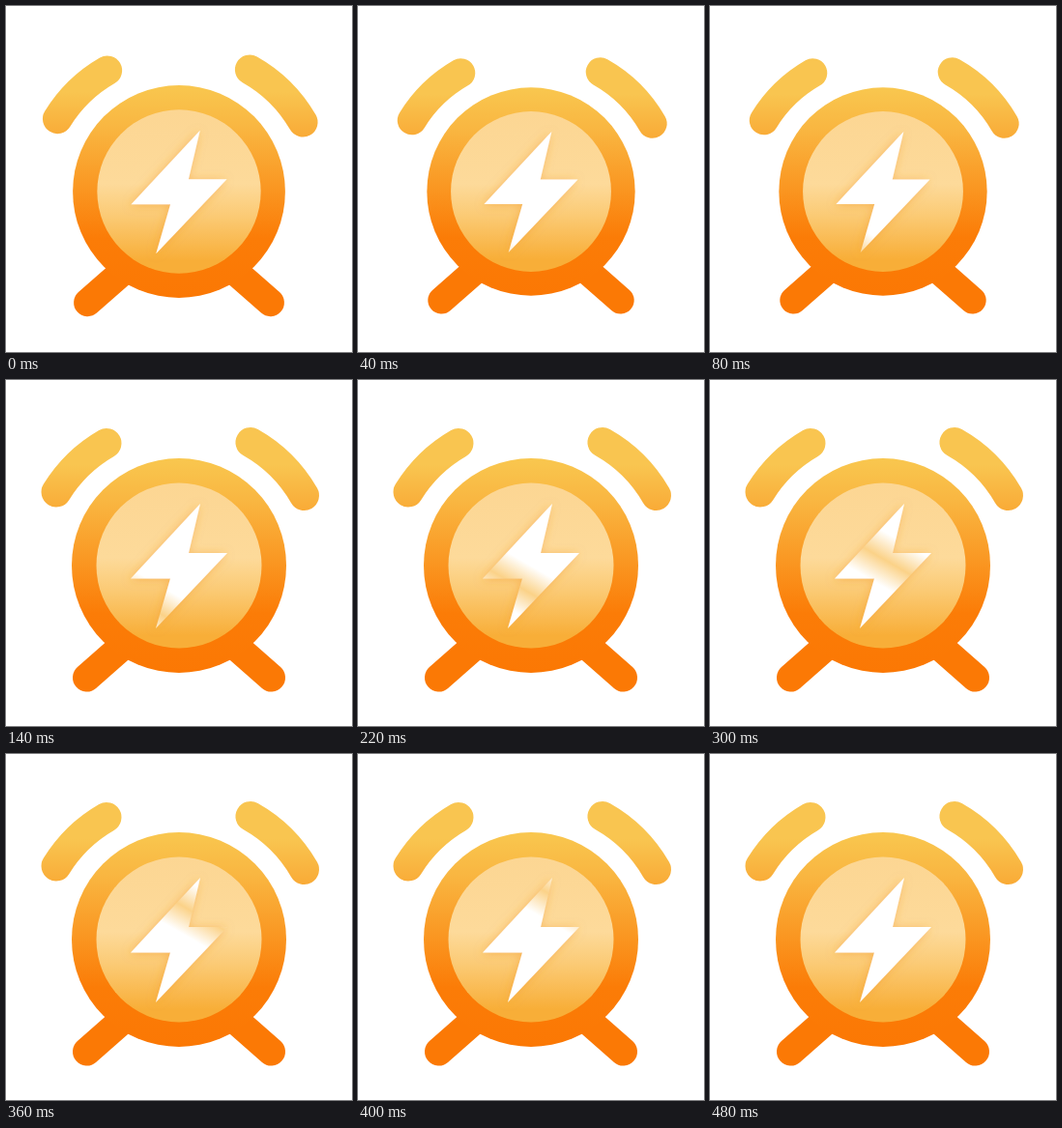
Write an HTML page that moves like this. It is 358 px wide and 358 px high and loops after 500 ms.

```html
<!DOCTYPE html>
<html lang="en">
<head>
<meta charset="utf-8">
<title>Alarm clock</title>
<style>
  html, body { margin: 0; width: 100%; height: 100%; overflow: hidden; background: #fff; }
  svg { display: block; width: 100vw; height: 100vh; }
</style>
</head>
<body>
<svg viewBox="0 0 358 358">
  <defs>
    <linearGradient id="body" gradientUnits="userSpaceOnUse" x1="0" y1="81" x2="0" y2="303">
      <stop offset="0" stop-color="#f9c74f"/>
      <stop offset=".2" stop-color="#f9b641"/>
      <stop offset=".72" stop-color="#fb7c07"/>
      <stop offset="1" stop-color="#fb7804"/>
    </linearGradient>
    <linearGradient id="bell" gradientUnits="userSpaceOnUse" x1="0" y1="50" x2="0" y2="134">
      <stop offset=".45" stop-color="#f9c550"/>
      <stop offset="1" stop-color="#f9ab37"/>
    </linearGradient>
    <linearGradient id="face" gradientUnits="userSpaceOnUse" x1="0" y1="107" x2="0" y2="278">
      <stop offset="0" stop-color="#fcd693"/>
      <stop offset=".45" stop-color="#fdda9a"/>
      <stop offset=".65" stop-color="#fbca74"/>
      <stop offset=".92" stop-color="#f8ae38"/>
    </linearGradient>
    <linearGradient id="shine" gradientUnits="userSpaceOnUse" x1="-25" y1="0" x2="25" y2="0">
      <stop offset="0" stop-color="#fff"/>
      <stop offset=".5" stop-color="#fbd288"/>
      <stop offset="1" stop-color="#fff"/>
    </linearGradient>
    <filter id="glow" x="-30%" y="-30%" width="160%" height="160%">
      <feDropShadow dx="-1" dy="1" stdDeviation="5" flood-color="#f39a2b" flood-opacity=".5"/>
    </filter>
  </defs>
  <g id="clock" fill="none" stroke-linecap="round">
    <path d="M83.500 308L125 271.500M274.500 308L233 271.500" stroke="#fb7905" stroke-width="29"/>
    <path d="M52 116A147.500 147.500 0 0 1 104 65.500M253 64.500A147.500 147.500 0 0 1 308.500 119.500" stroke="url(#bell)" stroke-width="31"/>
    <circle cx="179" cy="192" r="111" fill="url(#body)"/>
    <circle cx="179" cy="192" r="85.500" fill="url(#face)"/>
    <path d="M201 128L129 205.500H170L155 257L229 179H189Z" fill="url(#shine)" filter="url(#glow)"/>
  </g>
</svg>
<script>
  const LOOP = 500, STEP = 20, STEPS = LOOP / STEP;
  const clock = document.getElementById('clock');
  const shine = document.getElementById('shine');

  function draw(now) {
    const step = Math.floor((now % LOOP) / STEP);
    const t = step * STEP;

    // Quick squeeze to 96 % and back over eight steps
    const beat = (step + 1) % STEPS;
    const scale = 1 - 0.01 * Math.max(0, 4 - Math.abs(beat - 4));
    clock.setAttribute('transform', `translate(179 192) scale(${scale}) translate(-179 -192)`);

    // Tinted band sweeps up through the bolt, speeding up
    const shift = -92 + 0.24 * t + 0.00029 * t * t;
    shine.setAttribute('gradientTransform', `translate(179 192) rotate(-60) translate(${shift} 0)`);

    requestAnimationFrame(draw);
  }
  draw(performance.now());
</script>
</body>
</html>
```
